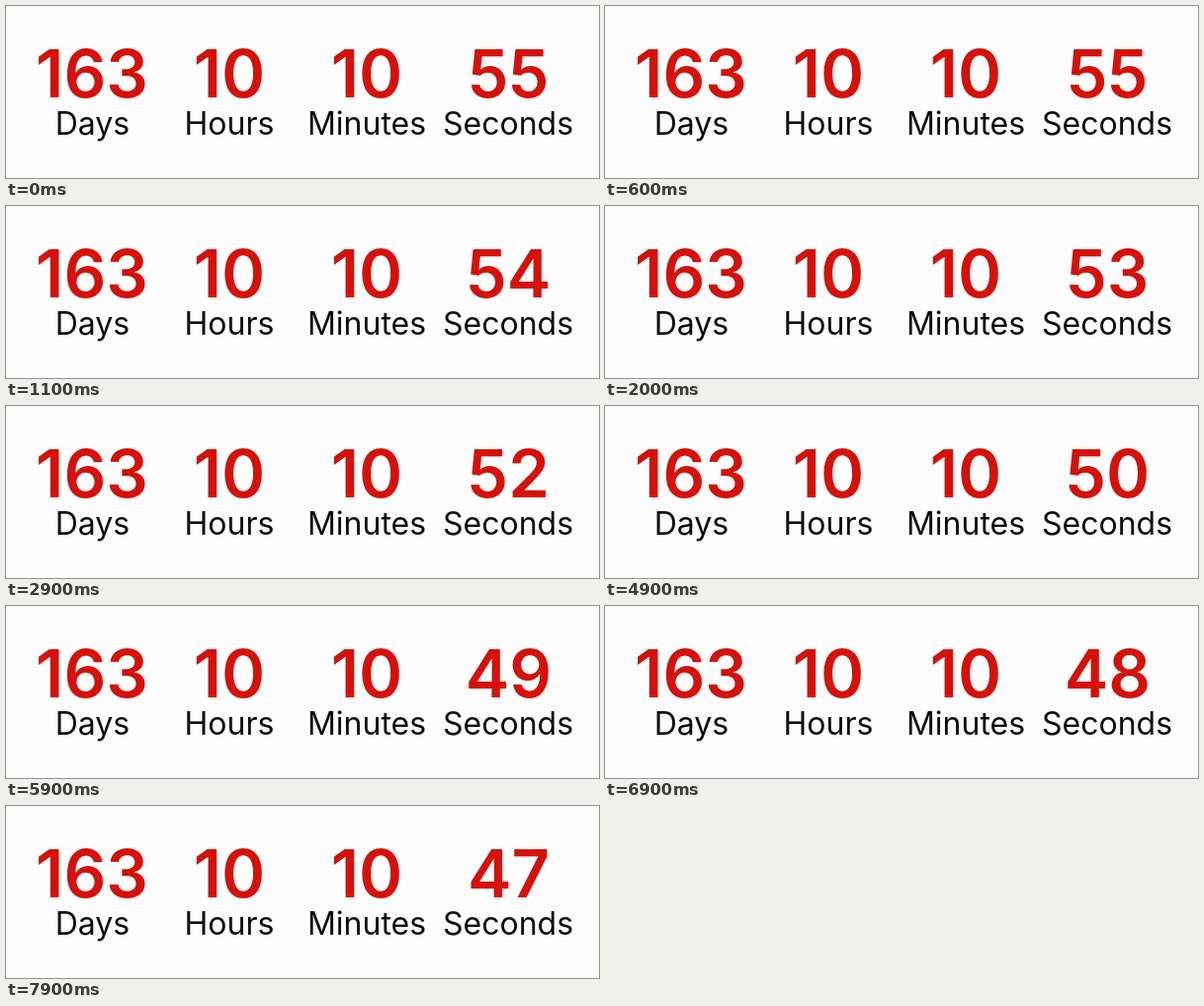
These frames come from a looping animation (600x175 px, 8 s). An HTML page:

```html
<!DOCTYPE html>
<html lang="en">
<head>
<meta charset="utf-8">
<title>Countdown</title>
<style>
  html, body { margin: 0; width: 100%; height: 100%; overflow: hidden; background: #fefdfe; }
  svg { display: block; width: 600px; height: 175px; }
  text { font-family: Inter, sans-serif; text-anchor: middle; }
  .value { font-size: 67px; font-weight: 600; fill: #d5110a; }
  .label { font-size: 32px; fill: #0c0c0c; }
</style>
</head>
<body>
<svg viewBox="0 0 600 175">
  <g class="value">
    <text x="87" y="93">163</text>
    <text x="226" y="93">10</text>
    <text x="365" y="93">10</text>
    <text x="508.5" y="93" id="seconds">55</text>
  </g>
  <g class="label">
    <text x="87.5" y="131">Days</text>
    <text x="226" y="131">Hours</text>
    <text x="365" y="131">Minutes</text>
    <text x="508" y="131">Seconds</text>
  </g>
</svg>
<script>
  const LOOP = 8000, FIRST = 55, TICK = 1000, OFFSET = 100;
  const seconds = document.getElementById('seconds');

  function draw() {
    const time = performance.now() % LOOP;
    const value = String(FIRST - Math.floor((time + OFFSET) / TICK));
    if (seconds.textContent !== value) seconds.textContent = value;
    requestAnimationFrame(draw);
  }
  draw();
</script>
</body>
</html>
```
